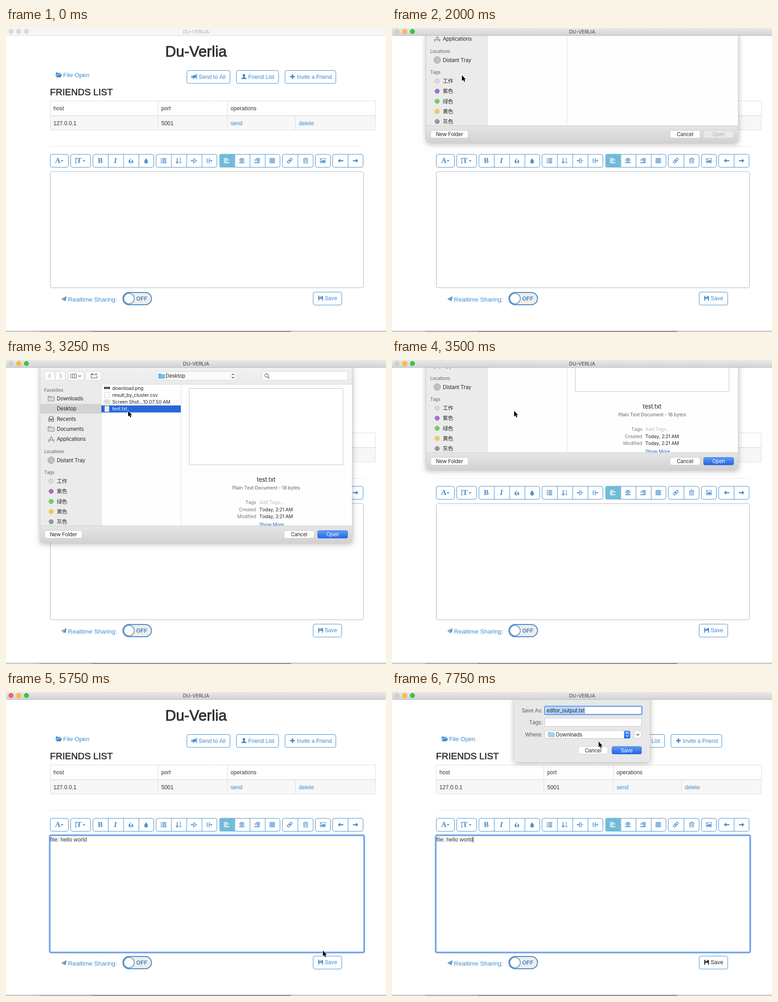
An HTML page with a canvas that plays this animation: 837 px wide and 669 px high, repeating every 8 s.

```html
<!DOCTYPE html>
<html lang="en">
<head>
<meta charset="utf-8">
<title>Du-Verlia</title>
<style>
html, body { margin: 0; width: 100%; height: 100%; overflow: hidden; background: #fff; }
canvas { display: block; width: 837px; height: 669px; }
</style>
</head>
<body>
<canvas id="stage" width="837" height="669"></canvas>
<script>
const ctx = document.getElementById('stage').getContext('2d');
const LOOP = 8000, STEP = 250;
const BLUE = '#428bca', SWITCH = '#4a88c3', INK = '#333';
const WEB = '"Liberation Sans", Arial, sans-serif';
const MAC = 'Inter, "Noto Sans CJK SC", "Noto Sans CJK", sans-serif';
const SERIF = '"Liberation Serif", serif';

// Icons are drawn in a 14 x 14 box.
const ICON = {
  folder: 'M0 11V2.5Q0 1.5 1 1.5H4Q5 1.5 5 2.5H10.5Q11.5 2.5 11.5 3.5V4.5H4L1 9V11ZM4.4 5.5H14.4L11.6 11Q11.2 12 10.3 12H.6Z',
  horn: 'M0 5H2V10H0ZM2.7 5Q7 5 10.5 1.5V11.5Q7.5 8.8 5.3 8.8L6.5 12.5H4.4L3 9H2.7ZM11.5 1H13V12H11.5Z',
  user: 'M7 .8C9 .8 10 2.3 9.8 4.3C9.7 6 9 6.9 8.4 7.5V8.5L12 10Q13 10.5 13 12.5H1Q1 10.5 2 10L5.6 8.5V7.5C5 6.9 4.3 6 4.2 4.3C4 2.3 5 .8 7 .8Z',
  plus: 'M5.5 1.5H8.5V5.5H12.5V8.5H8.5V12.5H5.5V8.5H1.5V5.5H5.5Z',
  plane: 'M13 1L11 12L7.5 10.4L5.8 13V9.8L11 3.6L4.4 9L1 7.6Z',
  disk: 'M1.5 1.5H11L12.5 3V12.5H1.5ZM4 1.5V5H9.5V1.5ZM3.7 8V12.5H10.3V8ZM7 2H8.7V4.4H7Z',
  fire: 'M6.6 1C8 4 5.2 5.6 5.4 8.2Q5.6 10 7 10.6Q5.9 12 6.6 13.2C3.6 12.9 1.8 11 2 8.6C2.3 5.6 6.4 4.6 6.6 1ZM10 3.6C9.8 5.8 12.2 7.4 12 9.8Q11.7 12.6 8.4 13.2Q9.6 11.6 8.6 10C7.4 7.6 9.6 6.4 10 3.6Z',
  drop: 'M7 1C8 4.4 11 6.3 11 9.2A4 4 0 0 1 3 9.2C3 6.3 6 4.4 7 1ZM4.7 9Q4.6 11 6.5 11.5Q5.4 10 5.7 8.3Z',
  list: 'M1 2H3V4H1ZM1 5.2H3V7.2H1ZM1 8.4H3V10.4H1ZM1 11.3H3V13H1ZM4.3 2H13V3.7H4.3ZM4.3 5.2H13V6.9H4.3ZM4.3 8.4H13V10.1H4.3ZM4.3 11.3H13V13H4.3Z',
  outdent: 'M5.5 1.5H7V13H5.5ZM8 3H11V4.5H8ZM8 6.2H14V7.8H8ZM8 9.8H11.5V11.3H8ZM0 7L3 4.7V6.3H5V7.7H3V9.3Z',
  indent: 'M1 3H4.5V4.5H1ZM1 6.2H6V7.8H1ZM1 9.8H5V11.3H1ZM7 1.5H8.4V13H7ZM14 7L11 4.7V6.3H9.2V7.7H11V9.3Z',
  trash: 'M1.5 3H5L5.6 1H8.4L9 3H12.5V4H11.8V12Q11.8 13.3 10.5 13.3H3.5Q2.2 13.3 2.2 12V4H1.5ZM6 3H8L7.7 2H6.3ZM3.4 4.3V12.2H10.6V4.3ZM4.4 5.5H5.3V11H4.4ZM6.5 5.5H7.4V11H6.5ZM8.6 5.5H9.5V11H8.6Z',
  image: 'M.5 1.5H13.5V12.5H.5ZM1.6 2.6V11.4H12.4V2.6ZM2.5 10.4V8.7L4.8 6.3L6.2 7.7L9.3 4.9L11.6 7.3V10.4ZM2.6 3.5H4.8V5.6H2.6Z',
  left: 'M1 7L6 2.5V5.8H13V8.2H6V11.5Z',
  right: 'M13 7L8 2.5V5.8H1V8.2H8V11.5Z',
  newFolder: 'M0 12V2H4.5L5.5 3.2H10V4.2H1V11H13V7H14V12ZM10.8 1H11.8V3H13.8V4H11.8V6H10.8V4H8.8V3H10.8Z',
  apps: 'M6.5 1L7.5 .4L13.5 13L12.5 13.4ZM7.2 .6L8.2 1L2 13.4L1 13ZM0 8.5H14V9.6H0Z',
  tray: 'M3 1H11L13 8V13H1V8ZM4 2V7H10V2ZM2.4 9V11.7H11.6V9H9L8.4 10.2H5.6L5 9Z'
};
for (const k in ICON) ICON[k] = new Path2D(ICON[k]);

function icon(name, cx, cy, color = BLUE, k = 1) {
  ctx.save();
  ctx.translate(cx - 7 * k, cy - 7 * k);
  ctx.scale(k, k);
  ctx.fillStyle = color;
  ctx.fill(ICON[name], 'evenodd');
  ctx.restore();
}
function rect(x, y, w, h, c) { ctx.fillStyle = c; ctx.fillRect(x, y, w, h); }
function box(x, y, w, h, r, fill, stroke, lw = 1) {
  ctx.beginPath();
  ctx.roundRect(x, y, w, h, r);
  if (fill) { ctx.fillStyle = fill; ctx.fill(); }
  if (stroke) { ctx.strokeStyle = stroke; ctx.lineWidth = lw; ctx.stroke(); }
}
function disc(x, y, r, fill, stroke, lw = 1) { box(x - r, y - r, 2 * r, 2 * r, r, fill, stroke, lw); }
function line(c, lw, ...p) {
  ctx.beginPath();
  for (let i = 0; i < p.length; i += 2) ctx.lineTo(p[i], p[i + 1]);
  ctx.strokeStyle = c; ctx.lineWidth = lw; ctx.stroke();
}
function fade(y0, y1, a, b) {
  const g = ctx.createLinearGradient(0, y0, 0, y1);
  g.addColorStop(0, a); g.addColorStop(1, b);
  return g;
}
function write(s, x, y, font, color, align, spacing, kerning = 'auto') {
  ctx.font = font; ctx.fillStyle = color; ctx.textAlign = align;
  ctx.letterSpacing = spacing; ctx.fontKerning = kerning;
  ctx.fillText(s, x, y);
}
function web(s, x, y, size = 12.2, color = INK, align = 'left') {
  write(s, x, y, size + 'px ' + WEB, color, align, '0px');
}
function mac(s, x, y, size = 11.3, color = '#262626', align = 'left', weight = 400) {
  write(s, x, y, weight + ' ' + size + 'px ' + MAC, color, align, '-0.18px', 'none');
}
function heavy(s, x, y, size, lw, align) {
  web(s, x, y, size, INK, align);
  ctx.strokeStyle = INK; ctx.lineWidth = lw; ctx.lineJoin = 'round';
  ctx.strokeText(s, x, y);
}

function titleBar(active, sheet) {
  rect(0, 0, 837, 17, active ? fade(0, 17, '#e9e9e9', '#d2d2d2') : '#f6f6f6');
  rect(0, 16, 837, 1, active ? '#b8b8b8' : '#dadada');
  const lit = ['#fc5d57', '#fdbd3e', '#33c748'], rim = ['#e8504a', '#e6aa2c', '#24b638'];
  for (let i = 0; i < 3; i++) {
    const on = active && !(sheet && i === 0);
    disc(11 + 17 * i, 7.7, 5, on ? lit[i] : active ? '#d0d0d0' : '#dcdcdc', on ? rim[i] : '#c6c6c6', .8);
  }
  mac('DU-VERLIA', 418.5, 12, 11, active ? '#444' : '#b0b0b0', 'center');
}

function button(x, w, y, label, name, tx, color = BLUE) {
  box(x + .5, y + .5, w - 1, 28.5, 4, '#fff', BLUE);
  icon(name, x + 17, y + 14, color, .95);
  web(label, tx, y + 18.7, 12.2, color);
}

function bars(cx, align, color) {
  [8, 12, 6, 12].forEach((w, i) => {
    if (align === 'full') w = 12;
    const x = align === 'left' ? cx - 6 : align === 'right' ? cx + 6 - w : cx - w / 2;
    rect(x, 286.5 + 3 * i, w, 1.8, color);
  });
}
function caret(x) {
  ctx.fillStyle = BLUE;
  ctx.beginPath();
  ctx.moveTo(x, 291); ctx.lineTo(x + 6, 291); ctx.lineTo(x + 3, 294.3);
  ctx.fill();
}
function glyph(s, x, style, size = 16.5) {
  write(s, x, 297.3, style + ' ' + size + 'px ' + SERIF, BLUE, 'center', '0px');
}

function toolbar() {
  // x, width, cell count
  [[97, 41, 1], [142, 45, 1], [191, 135, 4], [330, 135, 4], [470, 134, 4], [608, 69, 2], [681, 34, 1], [719, 68, 2]]
    .forEach(([x, w, n]) => {
      box(x + .5, 278, w - 1, 28.5, 4, '#fff', BLUE);
      for (let i = 1; i < n; i++) rect(x + i * w / n, 278, 1, 28.5, BLUE);
    });
  box(470, 277.5, 33.5, 29.5, [4, 0, 0, 4], '#72bbd8');
  glyph('A', 114, 'bold'); caret(120.5);
  rect(153, 286, 1.3, 12, BLUE);
  line(BLUE, 1, 151.8, 287.5, 153.6, 285.8, 155.5, 287.5);
  line(BLUE, 1, 151.8, 296.5, 153.6, 298.2, 155.5, 296.5);
  glyph('T', 161, 'bold', 16); caret(169);
  glyph('B', 207.5, 'bold', 16); glyph('I', 241, 'italic bold');
  icon('fire', 275, 292); icon('drop', 308.5, 292);
  icon('list', 347, 291.5);
  rect(376.2, 286, 1.7, 10, BLUE);
  line(BLUE, 1.3, 374, 294.5, 377, 297.7, 380, 294.5);
  write('1', 384, 290.5, 'bold 7px ' + WEB, BLUE, 'center', '0px');
  write('9', 384, 298, 'bold 7px ' + WEB, BLUE, 'center', '0px');
  icon('outdent', 414, 292); icon('indent', 447.5, 292);
  bars(486, 'left', '#fff'); bars(519.5, 'center', BLUE); bars(553, 'right', BLUE); bars(586.5, 'full', BLUE);
  ctx.save();
  ctx.translate(625, 292); ctx.rotate(-Math.PI / 4);
  box(-6.5, -2.3, 7.2, 4.6, 2.3, null, BLUE, 1.4);
  box(-.7, -2.3, 7.2, 4.6, 2.3, null, BLUE, 1.4);
  ctx.restore();
  icon('trash', 660, 291.5); icon('image', 698, 292, BLUE, .95);
  icon('left', 737, 292); icon('right', 770, 292);
}

function page(s) {
  rect(0, 0, 837, 669, '#fff');
  heavy('Du-Verlia', 418.5, 62.8, 33, 1, 'center');
  const link = s.hover ? '#2a6496' : BLUE;
  icon('folder', 116.5, 103.5, link, .98);
  web('File Open', 125.7, 108, 13.4, link);
  if (s.hover) rect(110, 109, 74, 1, link);
  button(398, 96, 93, 'Send to All', 'horn', 424.5);
  button(507, 94, 93, 'Friend List', 'user', 533.5);
  button(614, 113, 93, 'Invite a Friend', 'plus', 640.5);
  heavy('FRIENDS LIST', 97, 148.3, 20.4, .7, 'left');

  rect(97, 193, 716, 31, '#f7f7f7');
  box(97.5, 160.5, 716, 64, 0, null, '#ddd');
  rect(97, 192, 716, 1.5, '#ddd');
  rect(334, 161, 1, 64, '#ddd');
  rect(487, 161, 1, 64, '#ddd');
  rect(637, 193, 1, 32, '#ddd');
  web('host', 104.5, 181); web('port', 342, 181); web('operations', 494.7, 181);
  web('127.0.0.1', 104.5, 213.5); web('5001', 342, 213.5);
  web('send', 494.7, 213.5, 12.2, BLUE); web('delete', 645, 213.5, 12.2, BLUE);
  rect(97, 260, 691, 1, '#eaeaea');
  toolbar();

  if (s.focus) {
    box(96.3, 315.3, 692.7, 258, 3, '#fff', '#b5d0f7', 4.4);
    box(96.3, 315.3, 692.7, 258, 3, null, '#6a9fea', 2.6);
  } else box(97.5, 316, 690, 255.7, 4, '#fff', '#b2b2b2');
  if (s.text) web('file: hello world', 97.6, 329);
  if (s.caret) rect(178.5, 318.5, 1, 13, '#222');

  icon('plane', 127.5, 596, BLUE, .97);
  web('Realtime Sharing:', 136.6, 601.5, 13.6, BLUE);
  box(257.5, 582, 63, 27, 13.5, '#ededed', SWITCH, 2);
  disc(271, 595.5, 11.5, '#fff', SWITCH, 1.5);
  write('OFF', 287, 599.7, 'bold 12px ' + WEB, SWITCH, 'left', '0px');
  button(676, 64, 580.7, 'Save', 'disk', 701.7, s.saveHot ? '#222' : BLUE);

  rect(0, 666, 837, 1, '#c4c4c4');
  rect(0, 667, 837, 2, '#cfcfcf');
  rect(73, 667, 117, 2, '#adadad');
  rect(190, 667, 438, 2, '#8f8f8f');
}

function folder(x, y, fill, stroke) {
  box(x, y, 6, 4, 1, fill, stroke, .8);
  box(x, y + 1.8, 14, 9, 1, fill, stroke, .8);
}
function push(x, w, y, label, kind) {
  const blue = kind === 'blue', off = kind === 'off';
  box(x + .5, y + .5, w - 1, 16.5, 3, blue ? fade(y, y + 17, '#5f9ff8', '#2563e6') : off ? '#e9e9e9' : '#fff',
    blue ? '#2a63d8' : off ? '#d2d2d2' : '#c8c8c8', .8);
  mac(label, x + w / 2, y + 13, 11.3, blue ? '#fff' : off ? '#b4b4b4' : '#262626', 'center');
}
function tool(x, w, fill = '#fbfbfb') { box(x + .5, 25.5, w - 1, 19, 3, fill, '#d9d9d9'); }
function upDown(x, y, c) {
  line(c, 1.3, x - 2.7, y - 2, x, y - 4.6, x + 2.7, y - 2);
  line(c, 1.3, x - 2.7, y + 2, x, y + 4.6, x + 2.7, y + 2);
}
function sheet(x, w, h, dy, draw) {
  ctx.save();
  ctx.beginPath(); ctx.rect(0, 17, 837, 652); ctx.clip();
  ctx.translate(0, dy);
  ctx.shadowColor = 'rgba(0,0,0,.32)'; ctx.shadowBlur = 12; ctx.shadowOffsetY = 2;
  rect(x, 10, w, h - 10, '#e8e8e8');
  ctx.shadowColor = 'transparent';
  draw();
  ctx.restore();
}

function sidebar() {
  rect(76, 53, 134, 312, '#ebebeb');
  rect(209.5, 53, 1, 312, '#d6d6d6');
  [['Favorites', 69.5], ['Locations', 205], ['Tags', 251]]
    .forEach(([s, y]) => mac(s, 84, y, 9.8, '#777', 'left', 500));
  rect(76, 96.5, 134, 21.5, '#d3d3d3');
  ['Downloads', 'Desktop', 'Recents', 'Documents', 'Applications']
    .forEach((s, i) => mac(s, 112, 89.2 + 22.2 * i));
  folder(92.5, 79.5, '#d9d9d9', '#6e6e6e');
  icon('tray', 99.5, 129.5, '#6e6e6e');
  folder(92.5, 146.3, '#d9d9d9', '#6e6e6e');
  icon('apps', 99.5, 174, '#6e6e6e', 1.05);
  mac('Distant Tray', 112, 224.5);
  disc(99.5, 220.5, 7, '#d0d0d0', '#777');
  disc(99.5, 220.5, 4.3, null, '#999', .7);
  disc(99.5, 220.5, 2, '#f0f0f0', '#777', .8);
  [['工作', '#dedede', '#b0b0b0'], ['紫色', '#a671d2', '#9158c2'], ['绿色', '#72ce68', '#58b64e'],
   ['黄色', '#f3cb5c', '#dfb43c'], ['灰色', '#999', '#828282']].forEach(([s, fill, rim], i) => {
    const y = 266.8 + 22.25 * i;
    disc(99.5, y, 4.8, fill, rim);
    mac(s, 112, y + 4.2, 11.5);
  });
}

function openSheet(s) {
  rect(76, 10, 686, 43, fade(17, 53, '#f1f1f1', '#ebebeb'));
  tool(84, 24); tool(108, 23); tool(136, 36); tool(175, 36); tool(330, 178); tool(565, 188, '#fff');
  line('#999', 1.2, 98, 31, 94, 35.3, 98, 39.6);
  line('#999', 1.2, 118, 31, 122, 35.3, 118, 39.6);
  box(142.5, 31, 13, 8.5, 1, null, '#555');
  rect(146.3, 31, 1, 8.5, '#555'); rect(150.7, 31, 1, 8.5, '#555');
  line('#555', 1.2, 160, 34, 162.5, 36.6, 165, 34);
  icon('newFolder', 194, 35, '#555');
  folder(335.5, 30, '#79bce8', '#62a9da');
  mac('Desktop', 351.7, 39.3);
  upDown(500, 35.2, '#444');
  disc(574, 34.2, 3.8, null, '#555', 1.2);
  line('#555', 1.3, 576.7, 37, 580.3, 40.7);
  rect(76, 53, 686, 1, '#dadada');
  rect(210, 54, 552, 311, '#fefefe');
  rect(385, 54, 1, 311, '#dfdfdf');
  sidebar();

  if (s.picked) rect(210, 100, 175, 15.5, '#2a66d9');
  ['download.png', 'result_by_cluster.csv', 'Screen Shot…10.07.50 AM', 'test.txt'].forEach((name, i) => {
    const y = 61.7 + 15.3 * i;
    if (i === 0) { rect(216, y - 2.5, 13, 4.5, '#222'); rect(218, y - .7, 9, 1, '#ccc'); }
    else if (i === 2) { box(216, y - 4.5, 13, 9, 1, '#eee', '#b8b8b8', .8); rect(218, y - 2, 8, 3.5, '#ccc'); }
    else {
      box(217.5, y - 6, 9.5, 12, 0, '#fcfcfc', '#c8c8c8', .8);
      if (i === 3) for (let k = 0; k < 4; k++) rect(219, y - 3 + 2 * k, 6.5, .7, '#bbb');
    }
    mac(name, 234, y + 3.8, 10.5, s.picked && i === 3 ? '#fff' : '#262626');
  });

  if (s.preview) {
    box(403.5, 62.5, 339, 168, 0, '#fff', '#c6c6c6');
    mac('test.txt', 573, 268, 13, '#262626', 'center');
    mac('Plain Text Document - 18 bytes', 573, 285.3, 10.4, '#7a7a7a', 'center', 500);
    [['Tags', 'Add Tags...', '#bfbfbf'], ['Created', 'Today, 2:21 AM', '#262626'],
     ['Modified', 'Today, 2:21 AM', '#262626'], ['', 'Show More', '#1a66d8']].forEach(([k, v, c], i) => {
      const y = 317.2 + 15.5 * i + (i === 3 ? 2 : 0);
      mac(k, 551, y, 10.4, '#7a7a7a', 'right');
      mac(v, 558, y, 10.4, c);
    });
  }
  rect(76, 365, 686, 36.5, fade(365, 402, '#e6e6e6', '#d2d2d2'));
  rect(76, 364.5, 686, 1, '#cdcdcd');
  push(85, 83, 375, 'New Folder');
  push(612, 67, 375, 'Cancel');
  push(686, 67, 375, 'Open', s.preview ? 'blue' : 'off');
}

function saveSheet() {
  ['Save As:', 'Tags:', 'Where:'].forEach((t, i) => mac(t, 331, [45, 71, 97.7][i], 11.3, '#5a5a5a', 'right'));
  box(336.5, 31.5, 214, 18, 2, '#fff', '#6a9fee', 2.6);
  rect(339.5, 33.5, 86, 14.5, '#b4d5fb');
  mac('editor_output.txt', 340, 45);
  box(336.5, 57.5, 213, 18, 0, '#fff', '#c8c8c8');
  box(336.5, 85, 188, 17, 3, '#fff', '#c8c8c8');
  box(511, 85, 14, 17, [0, 3, 3, 0], fade(85, 102, '#5f9ff8', '#2563e6'));
  upDown(518, 93.5, '#fff');
  folder(344, 88, '#a4d0ee', '#8cc0e4');
  mac('Downloads', 361, 97.7);
  box(533.5, 85, 16, 17, 3, '#fff', '#c8c8c8');
  line('#444', 1.3, 538.5, 92.3, 541.5, 95.2, 544.5, 92.3);
  push(410, 66, 119.5, 'Cancel');
  push(484, 66, 119.5, 'Save', 'blue');
}

function pointer(x, y) {
  ctx.beginPath();
  [[0, 0], [0, 12.6], [2.9, 10], [5, 14.5], [7, 13.6], [5, 9.2], [8.8, 9.2]]
    .forEach(([a, b]) => ctx.lineTo(x + a, y + b));
  ctx.closePath();
  ctx.lineJoin = 'round';
  ctx.strokeStyle = '#fff'; ctx.lineWidth = 1.8; ctx.stroke();
  ctx.fillStyle = '#000'; ctx.fill();
}

// time, x, y: held until the next entry
const PATH = [[250, 147, 312], [500, 130, 215], [750, 116, 130], [1500, 154, 104], [2500, 215, 106],
  [2750, 269, 112], [4250, 272, 118], [4500, 317, 373], [4750, 345, 405], [5000, 372, 428], [5250, 470, 470],
  [5500, 600, 530], [5750, 698, 569], [6000, 706, 597], [7250, 640, 440], [7500, 545, 260], [7750, 455, 109]];
const OPEN = [[2000, -150], [2250, 0], [3500, -161], [3750, null]];
const SAVE = [[6500, -65], [6750, 0]];
const held = (keys, t) => keys.filter(k => k[0] <= t).pop();

function draw(t) {
  const at = (a, b = LOOP) => t >= a && t < b;
  const open = held(OPEN, t), save = held(SAVE, t), tip = held(PATH, t);
  const openUp = open && open[1] !== null;
  const s = {
    hover: at(1500, 2000), text: at(3750), focus: at(5000), saveHot: at(6000),
    caret: at(5000, 5500) || at(6000), picked: at(2750), preview: at(3000)
  };
  page(s);
  if (openUp) sheet(76, 686, 401.5, open[1], () => openSheet(s));
  if (save) sheet(269.5, 298.5, 154, save[1], saveSheet);
  titleBar(at(1250), openUp || save);
  if (tip) pointer(tip[1], tip[2]);
}

function tick() {
  const t = performance.now() % LOOP;
  draw(Math.floor(t / STEP) * STEP);
  requestAnimationFrame(tick);
}
tick();
</script>
</body>
</html>
```
